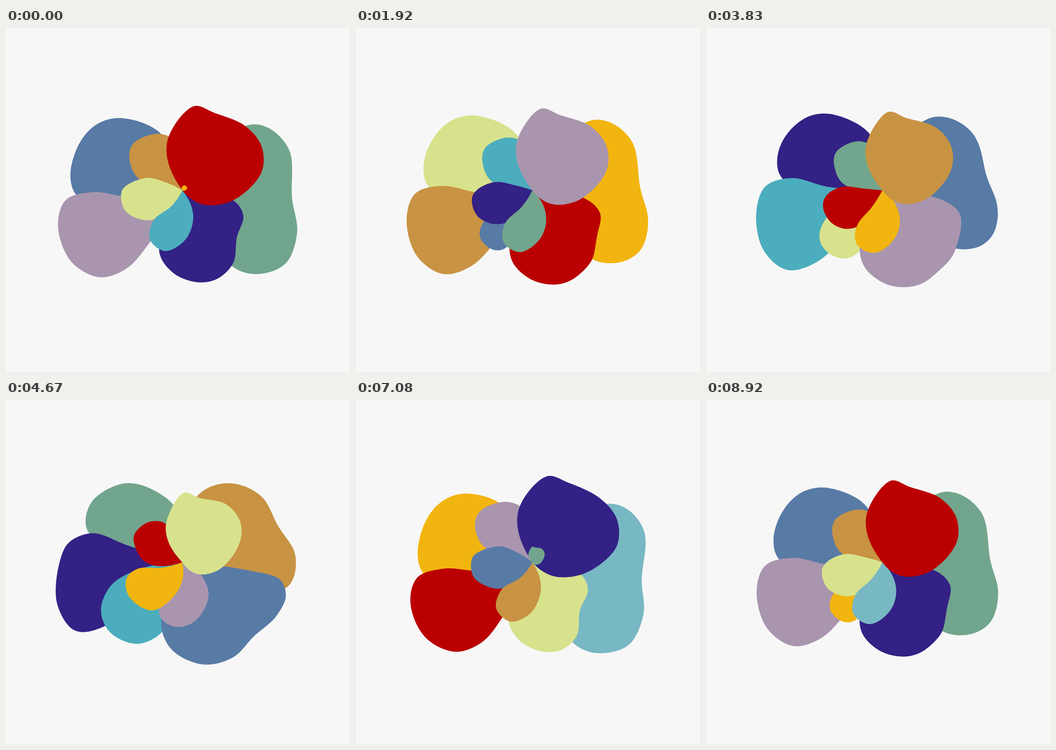
Write an HTML page with a canvas that moves like this. It is 748x748 px and loops after 9000 ms.

```html
<!DOCTYPE html>
<html lang="en">
<head>
<meta charset="utf-8">
<title>Petals</title>
<style>
  html, body { margin: 0; width: 100%; height: 100%; overflow: hidden; background: #f7f7f7; }
  canvas { display: block; width: 100vw; height: 100vh; }
</style>
</head>
<body>
<canvas id="stage" width="748" height="748"></canvas>
<script>
const ctx = document.getElementById('stage').getContext('2d');
const SIZE = 748, TIP = [383.5, 353], SAMPLES = 128;
const STEPS = 12, PETALS = 9, LIFE = STEPS * PETALS;

const TEAL = 4, PALE_TEAL = '#78b8c3', REBIRTH = 60;
const colours = ['#f2b50f', '#ba0000', '#72a58d', '#332185', '#4badbd',
                 '#d8e28d', '#c89343', '#587ba5', '#a995ae'];

// Slope at knot i, from the parabola through its neighbours.
function slope(ts, vs, i) {
  const last = ts.length - 1;
  const rise = j => (vs[j + 1] - vs[j]) / (ts[j + 1] - ts[j]);
  if (i === 0) return 2 * rise(0) - slope(ts, vs, 1);
  if (i === last) return 2 * rise(last - 1) - slope(ts, vs, last - 1);
  const a = ts[i] - ts[i - 1], b = ts[i + 1] - ts[i];
  return (rise(i - 1) * b + rise(i) * a) / (a + b);
}

function segment(ts, t) {
  let i = 0;
  while (i < ts.length - 2 && t > ts[i + 1]) i++;
  return i;
}

function spline(ts, vs, t) {
  const i = segment(ts, t), h = ts[i + 1] - ts[i], u = (t - ts[i]) / h, w = 1 - u;
  return w * w * (1 + 2 * u) * vs[i] + u * u * (3 - 2 * u) * vs[i + 1]
    + h * u * w * (w * slope(ts, vs, i) - u * slope(ts, vs, i + 1));
}

const distance = (a, b) => Math.hypot(b[0] - a[0], b[1] - a[1]);

// Closed curve from the tip through a few points, sampled at even spacing.
function outline(points) {
  const knots = [TIP, ...points, TIP], ts = [0];
  for (let i = 1; i < knots.length; i++) {
    ts.push(ts[i - 1] + Math.sqrt(distance(knots[i - 1], knots[i])));
  }
  const xs = knots.map(p => p[0]), ys = knots.map(p => p[1]);
  const fine = 480, end = ts[ts.length - 1], dense = [], length = [0];
  for (let i = 0; i <= fine; i++) {
    const t = end * i / fine;
    dense.push([spline(ts, xs, t), spline(ts, ys, t)]);
    if (i) length.push(length[i - 1] + distance(dense[i - 1], dense[i]));
  }
  const result = [];
  for (let n = 0, j = 0; n < SAMPLES; n++) {
    const goal = length[fine] * n / SAMPLES;
    while (length[j + 1] < goal) j++;
    const f = (goal - length[j]) / (length[j + 1] - length[j]);
    result.push([0, 1].map(c => dense[j][c] + f * (dense[j + 1][c] - dense[j][c])));
  }
  return result;
}

const ages = [], poses = [];
function pose(age, ...points) {
  ages.push(age);
  poses.push(outline(points));
}

// One petal's life, by age in steps: key points clockwise from the tip.
// Born as a dot, it swells to the upper right and swings down the right side.
pose(0, [382, 347], [388, 342], [394, 348], [388, 354]);
pose(12, [350, 250], [408, 170], [452, 184], [520, 213], [556, 258], [555, 315], [495, 374], [430, 384]);
pose(19, [380, 243], [410, 197], [472, 174], [541, 195], [583, 254], [625, 312], [614, 381], [480, 390]);
pose(24, [521, 213], [570, 217], [616, 266], [622, 370], [633, 445], [608, 512], [548, 535], [490, 517]);
pose(31, [530, 364], [610, 378], [627, 415], [605, 458], [553, 504], [511, 555], [446, 578], [372, 550], [343, 490]);
// It shrinks below the tip and turns to the left.
pose(36, [493, 374], [516, 408], [502, 455], [494, 511], [460, 545], [417, 553], [363, 532], [333, 484]);
pose(43, [424, 372], [450, 420], [422, 482], [375, 498], [338, 473]);
pose(48, [407, 408], [391, 459], [346, 485], [313, 460], [321, 418], [360, 387]);
pose(55, [382, 410], [328, 465], [274, 439], [264, 398], [286, 376], [340, 371]);
pose(60, [352, 402], [305, 418], [259, 397], [253, 352], [305, 326], [348, 336]);
// It swells again at the upper left, sinks and vanishes behind the others.
pose(72, [288, 327], [268, 280], [278, 250], [330, 230], [365, 245]);
pose(79, [188, 275], [196, 215], [270, 180], [335, 201], [379, 247]);
pose(84, [200, 385], [152, 362], [140, 318], [160, 250], [198, 209], [252, 196], [338, 231]);
pose(91, [192, 486], [140, 486], [109, 425], [120, 340], [143, 294], [195, 274], [267, 303]);
pose(96, [312, 467], [262, 523], [203, 542], [141, 507], [113, 430], [130, 374], [190, 357], [270, 367]);
pose(103, [345, 505], [279, 541], [210, 511], [189, 455], [213, 400], [271, 368]);
pose(107, [327, 477], [298, 482], [270, 456], [278, 421]);

// Petal slots from back to front.
function stacking(step) {
  if (step < 4) return [7, 8, 6, 2, 3, 5, 4, 1, 0];
  if (step < 9) return [6, 7, 8, 1, 2, 3, 5, 4, 0];
  return [6, 7, 8, 1, 2, 5, 4, 3, 0];
}

function drawPetal(age, colour) {
  const i = segment(ages, age), from = Math.max(0, i - 1);
  const ts = ages.slice(from, i + 3), near = poses.slice(from, i + 3);
  const at = (n, c) => spline(ts, near.map(p => p[n][c]), age);
  ctx.beginPath();
  for (let n = 0; n < SAMPLES; n++) ctx.lineTo(at(n, 0), at(n, 1));
  ctx.closePath();
  ctx.fillStyle = colour;
  ctx.fill();
}

function draw(k) {
  ctx.fillStyle = '#f7f7f7';
  ctx.fillRect(0, 0, SIZE, SIZE);
  const step = k % STEPS, turn = Math.floor(k / STEPS);
  for (const slot of stacking(step)) {
    const petal = (slot - turn + PETALS) % PETALS;
    const colour = petal === TEAL && k >= REBIRTH ? PALE_TEAL : colours[petal];
    drawPetal(slot * STEPS + step, colour);
  }
}

// Twelve steps a second; the small lead absorbs rounding to hundredths.
let shown = -1;
function frame() {
  const k = Math.floor((performance.now() + 5) * STEPS / 1000) % LIFE;
  if (k !== shown) draw(shown = k);
  requestAnimationFrame(frame);
}
frame();
</script>
</body>
</html>
```
